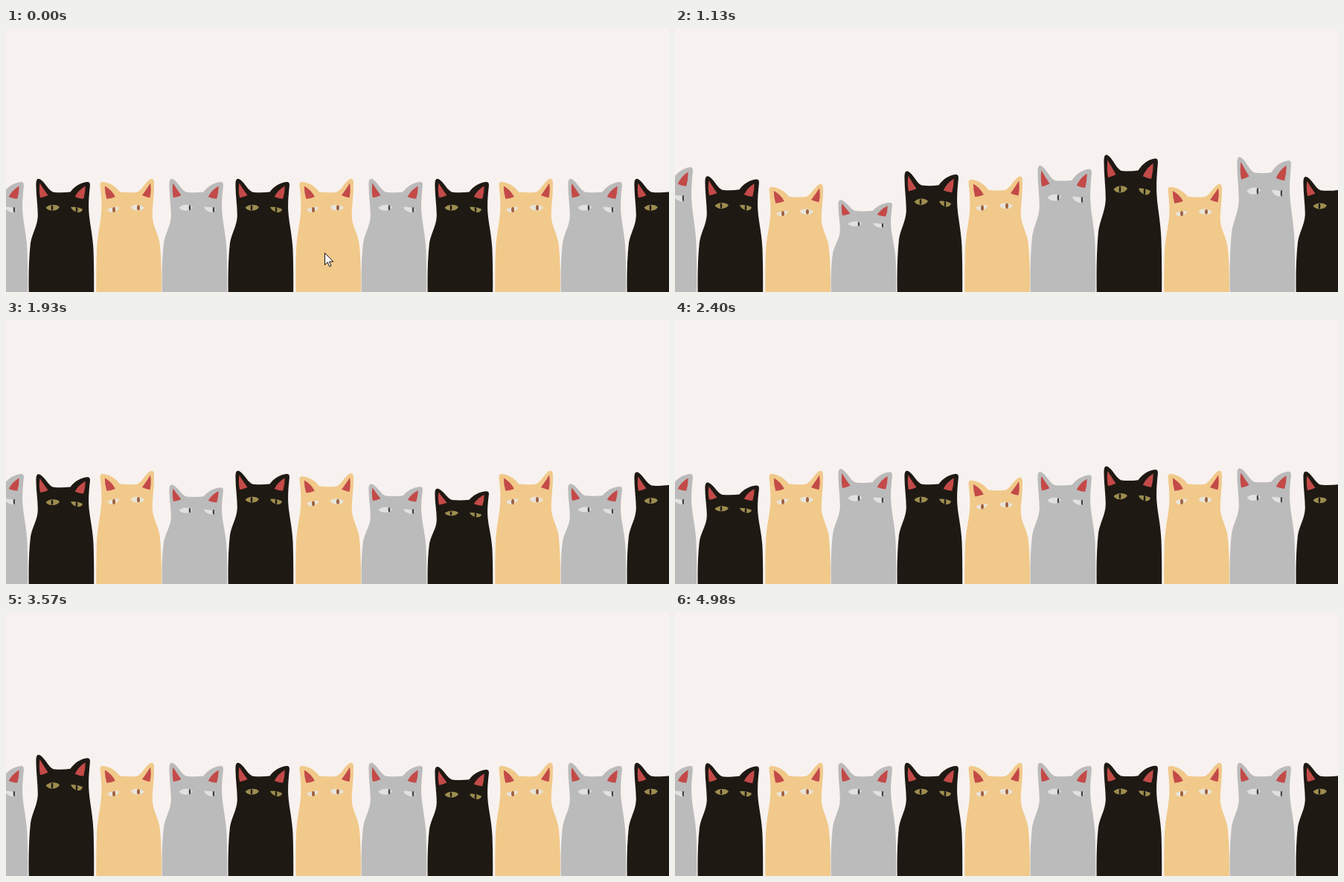
Animation, 891 px wide and 355 px high, one loop 5650 ms. Source, as an HTML page:

```html
<!DOCTYPE html>
<html lang="en">
<head>
<meta charset="utf-8">
<title>Bouncing cats</title>
<style>
  html, body { margin: 0; width: 100%; height: 100%; overflow: hidden; background: #f7f2ef; }
  svg { display: block; width: 891px; height: 355px; }
</style>
</head>
<body>
<svg id="stage" viewBox="0 0 891 355">
  <defs>
    <path id="body" d="M31 375C30.3 345 30 315 33 289C35.5 275 42.5 266 42.8 252C42.8 238 40 222 40.5 208
      C41 202 44 201.5 48 205C54 210 57 218 63.5 220.8Q75 222 86.5 220.5C92 213 100 208 109 207
      C113 207 113.5 209 112.5 216C111.5 226 110.5 238 111.5 249C112.5 263 116.5 278 117.5 298C118.5 325 118.3 350 118 375Z"/>
    <path id="ears" fill="#c34a48" d="M45.5 208.5C48 213 53 220 56.5 225Q51 227.5 46 228.3Q43.8 218 45.5 208.5Z
      M106.7 212.5Q97.5 217.5 92.7 227Q98.5 229.5 104.2 229.8Q106.8 221 106.7 212.5Z"/>
    <path id="eyes" d="M53.5 241.5Q57 238 63 237.7Q70 237.8 72 241Q69 245.5 62.5 245.6Q56 245.5 53.5 241.5Z
      M87 240.7Q95 239.7 103 243.5Q102 248 97 248Q89 246.5 87 240.7Z"/>
  </defs>
  <g id="cats"></g>
  <path id="cursor" fill="#fff" stroke="#111" d="M428.5 302.5V318.5L432.2 315L434.8 320.8L437 319.8L434.5 314.2H439.8Z"/>
</svg>
<script>
const LOOP = 5650, START = 554, FLOOR = 370, STRETCH = 0.25, RAMP = 310, CURSOR_OFF = 1120;

const kinds = {
  black:  { fur: '#1e1913', eye: '#9d8d4f', pupil: '#1e1913', pupils: [62, 95], rx: 1.3 },
  grey:   { fur: '#bbbbbb', eye: '#e2e1e0', pupil: '#4a4444', pupils: [68, 100], rx: 1.3 },
  orange: { fur: '#f1c98a', eye: '#e8e4da', pupil: '#a0623f', pupils: [61.5, 94.5], rx: 2, mirror: true }
};

// kind, x offset, wobbles per second, duration in ms, delay in ms
const cats = [
  ['grey', -89, 8.13, 1200, 0],
  ['black', 0, 6.2, 4480, 10],
  ['orange', 239.5, 8.75, 1300, 0],
  ['grey', 179, 8.95, 2750, 0],
  ['black', 268, 8.1, 800, 0],
  ['orange', 507.5, 6.2, 2750, 10],
  ['grey', 447, 8.21, 2750, 18],
  ['black', 536, 8.1, 4480, 0],
  ['orange', 775.5, 8.75, 1300, 0],
  ['grey', 715, 8.1, 2780, 0],
  ['black', 804, 6.2, 1900, 10]
];

function markup([name, x]) {
  const k = kinds[name];
  const pupil = (cx, cy) => `<ellipse cx="${cx}" cy="${cy}" rx="${k.rx}" ry="3.6" fill="${k.pupil}"/>`;
  return `<g><g transform="translate(${x})${k.mirror ? ' scale(-1 1)' : ''}">
    <use href="#body" fill="${k.fur}"/><use href="#ears"/><use href="#eyes" fill="${k.eye}"/>
    ${pupil(k.pupils[0], 241.7)}${pupil(k.pupils[1], 244.3)}</g></g>`;
}

// Sine wobble that swells briefly, then fades linearly to rest
function scaleAt(time, [, , freq, length, delay]) {
  const t = time - START - delay;
  if (t <= 0 || t >= length) return 1;
  const size = STRETCH * Math.min(1, t / RAMP) * (1 - t / length);
  return 1 - size * Math.sin(2 * Math.PI * freq * t / 1000);
}

const group = document.getElementById('cats');
const cursor = document.getElementById('cursor');
group.innerHTML = cats.map(markup).join('');
const nodes = [...group.children];

function draw(time) {
  nodes.forEach((node, i) => {
    const s = scaleAt(time, cats[i]);
    node.setAttribute('transform', `matrix(1 0 0 ${s} 0 ${FLOOR * (1 - s)})`);
  });
  cursor.style.visibility = time < CURSOR_OFF ? 'visible' : 'hidden';
}

const begin = performance.now();
function tick() {
  draw((performance.now() - begin) % LOOP);
  requestAnimationFrame(tick);
}
draw(0);
requestAnimationFrame(tick);
</script>
</body>
</html>
```
